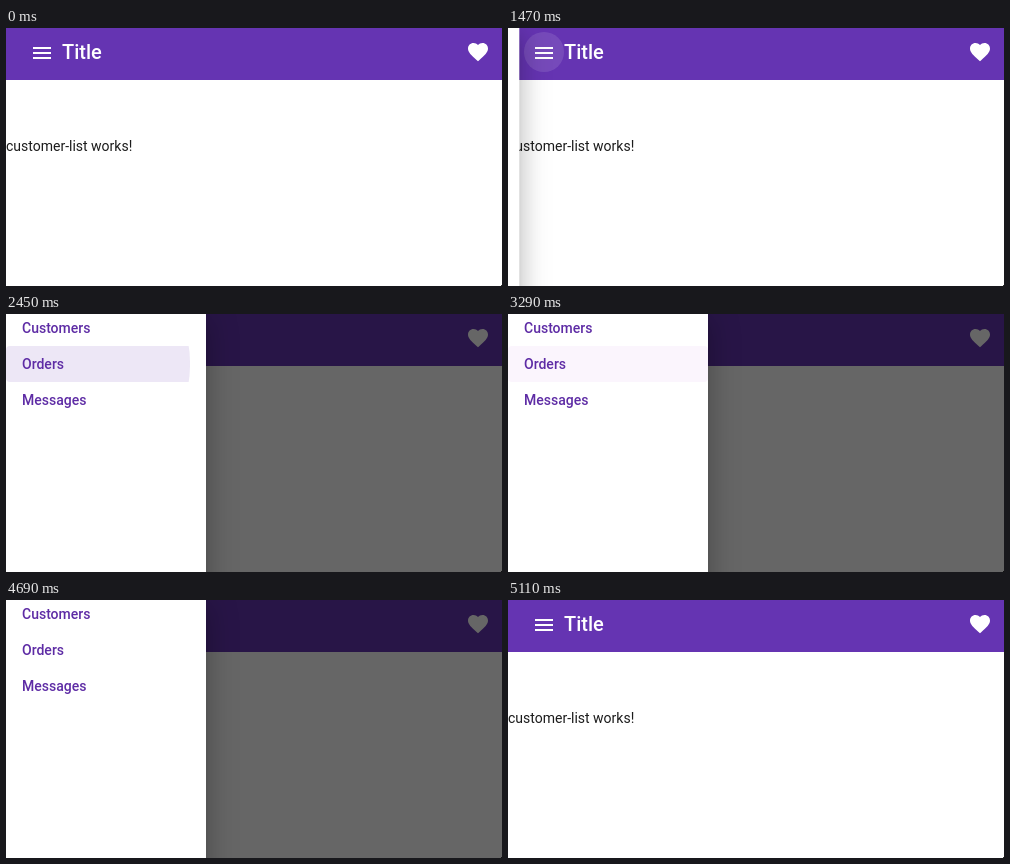
An HTML page for the animation above (6.93 s loop, 496 by 258 pixels).

```html
<!DOCTYPE html>
<html lang="en">
<head>
<meta charset="utf-8">
<title>Side menu</title>
<style>
  html, body { margin: 0; width: 100%; height: 100%; overflow: hidden; background: #fff; }
  #stage { position: relative; width: 496px; height: 258px; overflow: hidden; background: #fff;
    font: 14px/20px Roboto, sans-serif; color: #1c1c1c; }
  #stage div, svg { position: absolute; }
  .bar { left: 0; top: -4px; width: 496px; height: 56px; background: #6534b2; color: #fff; }
  .title { left: 56px; top: 0; font-size: 20px; font-weight: 500; line-height: 56px; }
  .halo { left: 16px; top: 8px; width: 40px; height: 40px; border-radius: 50%; background: #fff; opacity: 0; }
  svg { width: 24px; height: 24px; fill: #fff; }
  .menu { left: 24px; top: 17px; }
  .heart { left: 460px; top: 16px; }
  .text { left: 0; top: 108px; white-space: nowrap; }
  .corner { right: 0; bottom: 0; width: 1px; height: 1px; background: #333; }
  .shade { inset: 0; background: #000; opacity: 0; }
  .drawer { left: 0; top: -4px; width: 200px; height: 300px; background: #fff;
    box-shadow: 0 8px 10px -5px rgba(0,0,0,.2), 0 16px 24px 2px rgba(0,0,0,.14), 0 6px 30px 5px rgba(0,0,0,.12); }
  .item { left: 0; width: 200px; height: 36px; border-radius: 4px; overflow: hidden; }
  .item span { position: absolute; left: 16px; font-weight: 500; line-height: 36px; color: #5e2ca5; }
  .hover { inset: 0; background: #fbf5fd; opacity: 0; }
  .ripple { left: -80px; top: -122px; width: 280px; height: 280px; border-radius: 50%;
    background: #6534b2; opacity: 0; }
</style>
</head>
<body>
<div id="stage">
  <div class="bar">
    <div class="halo"></div>
    <svg class="menu" viewBox="0 0 24 24"><path d="M3 6h18v2H3zM3 11h18v2H3zM3 16h18v2H3z"/></svg>
    <div class="title">Title</div>
    <svg class="heart" viewBox="0 0 24 24"><path d="M12 21.35l-1.45-1.32C5.4 15.36 2 12.28 2 8.5 2 5.42 4.42 3 7.5 3c1.74 0 3.41.81 4.5 2.09C13.09 3.81 14.76 3 16.5 3 19.58 3 22 5.42 22 8.5c0 3.78-3.4 6.86-8.55 11.54z"/></svg>
  </div>
  <div class="text">customer-list works!</div>
  <div class="corner"></div>
  <div class="shade"></div>
  <div class="drawer"></div>
</div>
<script>
const LOOP = 6930, STEP = 70;
const SWIFT = 'cubic-bezier(.25,.8,.25,1)', SOFT = 'cubic-bezier(.35,0,.25,1)';
const $ = s => document.querySelector(s);
const tracks = [];

// Each step: [ms, value, easing towards the next step]
function track(el, prop, steps) {
  const all = [[0, steps[0][1]], ...steps, [LOOP, steps[steps.length - 1][1]]];
  const frames = all.map(([ms, value, easing = 'linear']) =>
    ({ offset: ms / LOOP, [prop]: value, easing }));
  const anim = el.animate(frames, { duration: LOOP, fill: 'both' });
  anim.pause();
  tracks.push(anim);
}

function add(parent, cls) {
  const el = document.createElement('div');
  el.className = cls;
  parent.append(el);
  return el;
}

// Hover spans as [enter, leave]
const items = [
  ['Customers', [[1720, 2260], [3720, 4220]]],
  ['Orders', [[2440, 2840], [3150, 3680]]],
  ['Messages', [[2860, 3120]]]
];

items.forEach(([name, spans], i) => {
  const item = add($('.drawer'), 'item');
  item.style.top = i * 36 + 'px';
  const hover = add(item, 'hover');
  track(hover, 'opacity', spans.flatMap(([a, b]) =>
    [[a, 0, SOFT], [a + 140, 1], [b, 1, SOFT], [b + 140, 0]]));
  if (name === 'Orders') {
    const ripple = add(item, 'ripple');
    track(ripple, 'transform', [[2310, 'scale(0)', 'cubic-bezier(0,0,.2,1)'], [2450, 'scale(.886)'], [2535, 'scale(1.03)']]);
    track(ripple, 'opacity', [[2310, 0], [2380, .12], [2560, .12], [2720, 0]]);
  }
  const label = document.createElement('span');
  label.textContent = name;
  item.append(label);
});

track($('.halo'), 'opacity', [[1399, 0], [1400, .11], [1900, .11], [1901, 0]]);
track($('.drawer'), 'transform', [
  [1463, 'translateX(-200px)', SWIFT], [1863, 'translateX(0)'],
  [4705, 'translateX(0)', SWIFT], [5105, 'translateX(-200px)']]);
track($('.drawer'), 'visibility', [
  [1463, 'hidden'], [1464, 'visible'], [5104, 'visible'], [5105, 'hidden']]);
track($('.shade'), 'opacity', [
  [1485, 0, SWIFT], [1885, .6], [4705, .6, SWIFT], [5105, 0]]);

const start = performance.now();
function draw() {
  const t = (performance.now() - start) % LOOP;
  const shown = Math.floor((t + .5) / STEP) * STEP % LOOP;
  for (const anim of tracks) anim.currentTime = shown;
  requestAnimationFrame(draw);
}
draw();
</script>
</body>
</html>
```
